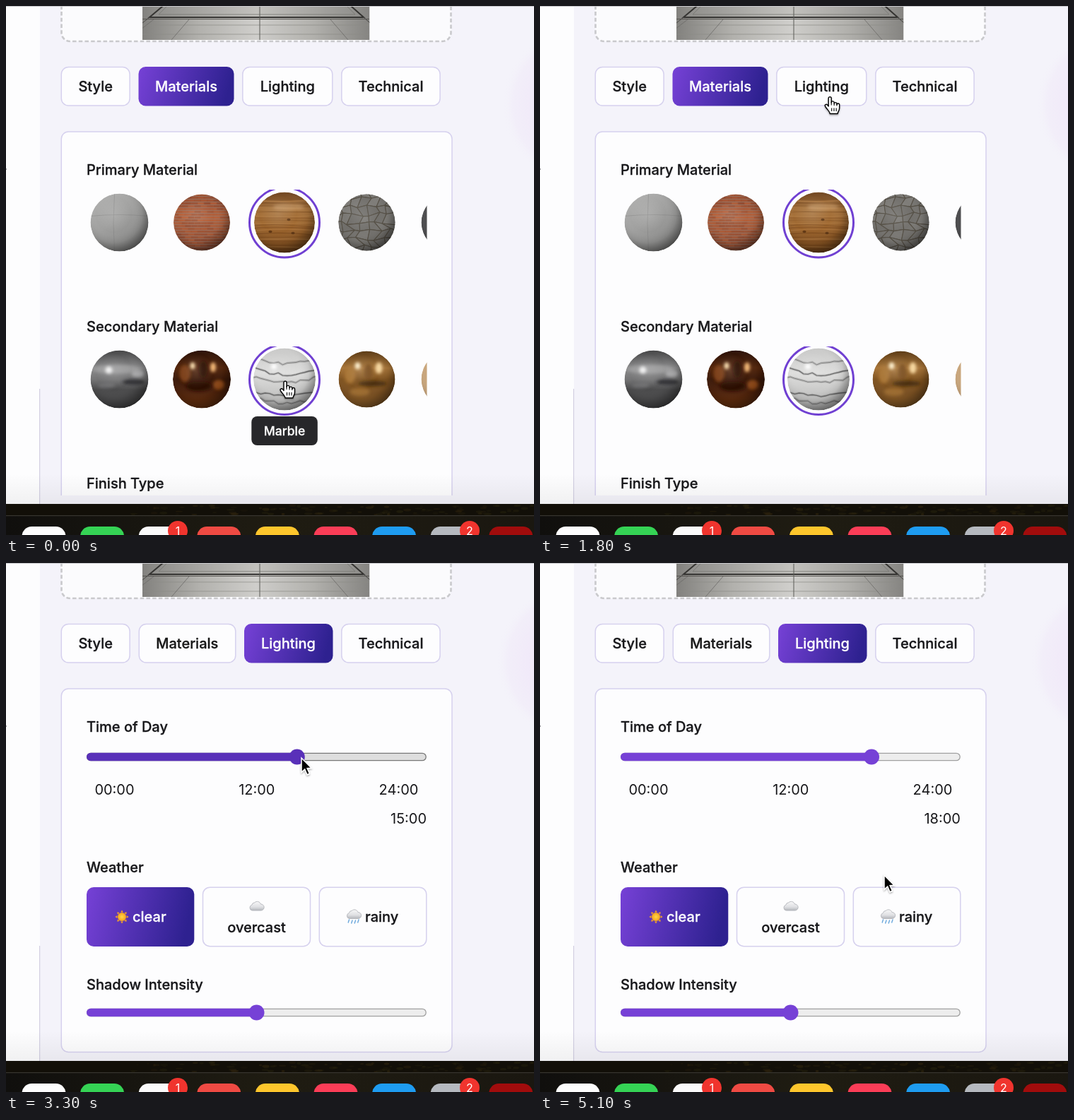
Animation, 747 px wide and 749 px high, one loop 5.2 s. Source, as an HTML page:

```html
<!DOCTYPE html>
<html lang="en">
<head>
<meta charset="utf-8">
<title>Material and lighting panel</title>
<style>
html, body { margin: 0; width: 100%; height: 100%; overflow: hidden; background: #12100c; }
svg { display: block; width: 747px; height: 749px; }
text { font-family: Inter, "Open Sans", sans-serif; white-space: pre; }
</style>
</head>
<body>
<svg id="stage" viewBox="0 0 747 749"></svg>
<script>
const LOOP = 5200, STEP = 100;
const INK = '#17171a', EDGE = '#d6d1ee', PURPLE = '#7641d6';
const stage = document.getElementById('stage');

let seed = 7;
const rnd = () => (seed = (seed * 16807) % 2147483647) / 2147483647;
const span = (a, b) => a + (b - a) * rnd();
const clamp = v => Math.max(0, Math.min(1, v));
const mix = (a, b, p) => a + (b - a) * p;
const list = (n, fn) => Array.from({ length: n }, (_, i) => fn(i)).join('');
const grey = v => `rgb(${[v, v, v].map(Math.round)})`;

const rect = (x, y, w, h, r, fill, more = '') =>
  `<rect x="${x}" y="${y}" width="${w}" height="${h}" rx="${r}" fill="${fill}" ${more}/>`;
const circle = (x, y, r, fill, more = '') =>
  `<circle cx="${x}" cy="${y}" r="${r}" fill="${fill}" ${more}/>`;
const line = (d, color, w = 1, more = '') =>
  `<path d="${d}" fill="none" stroke="${color}" stroke-width="${w}" ${more}/>`;
const label = (x, y, s, { size = 20, weight = 500, fill = INK, anchor = 'start' } = {}) =>
  `<text x="${x}" y="${y}" font-size="${size}" font-weight="${weight}" fill="${fill}" ` +
  `stroke="${fill}" stroke-width="${weight > 400 ? .3 : 0}" text-anchor="${anchor}">${s}</text>`;
const outlined = (x, y, w, h, fill = '#fdfdfe') =>
  rect(x, y, w, h, 10, fill, `stroke="${EDGE}" stroke-width="1.5"`);

const stops = cs => cs.map(([o, c, a = 1]) =>
  `<stop offset="${o}" stop-color="${c}" stop-opacity="${a}"/>`).join('');
const linear = (id, x2, y2, cs) =>
  `<linearGradient id="${id}" x2="${x2}" y2="${y2}">${stops(cs)}</linearGradient>`;
const vertical = (id, cs) => linear(id, 0, 1, cs);

const defs = `<defs>
${linear('active', 1, .12, [[0, '#7641d6'], [1, '#2e2190']])}
${linear('sketch', 1, 0, [[0, '#82817e'], [.25, '#b2b1ad'], [.5, '#cfcecb'], [.75, '#b2b1ad'], [1, '#858481']])}
${linear('rug', 1, 0, [[0, '#8d8c89'], [.5, '#c2c1bd'], [1, '#8d8c89']])}
${vertical('fall', [[0, '#000', 0], [1, '#000', .05]])}
${linear('dock', 1, 0, [[0, '#100f0d'], [.5, '#1f1c12'], [1, '#1a1710']])}
${linear('concrete', .7, 1, [[0, '#b4b4b3'], [.5, '#a0a09f'], [1, '#858584']])}
${vertical('brick', [[0, '#8f4a30'], [.4, '#b0603c'], [1, '#8a4a33']])}
${vertical('wood', [[0, '#6f4520'], [.3, '#a8743d'], [.6, '#9a632c'], [1, '#744519']])}
${vertical('steel', [[0, '#434344'], [.3, '#8a8a8b'], [.5, '#747475'], [.68, '#4a4a4b'], [1, '#4a4a4b']])}
${vertical('copper', [[0, '#2a1006'], [.3, '#54260c'], [.5, '#3a1808'], [.7, '#4b200a'], [1, '#6b3410']])}
${vertical('gold', [[0, '#5b3a14'], [.3, '#a87539'], [.5, '#80531f'], [.75, '#7c5122'], [1, '#8a5d28']])}
${vertical('marble', [[0, '#c9c9c8'], [.4, '#dededd'], [1, '#b3b3b2']])}
<radialGradient id="shade" cx=".4" cy=".36" r=".68">${stops([[0, '#fff', .12], [.45, '#fff', 0], [.72, '#000', .08], [1, '#000', .48]])}</radialGradient>
<radialGradient id="blob">${stops([[0, '#efe5f8'], [.6, '#f1eaf9'], [.85, '#f2eef9'], [1, '#f4f3fa', 0]])}</radialGradient>
<radialGradient id="sun">${stops([[0, '#ffd84a'], [1, '#f6a21c']])}</radialGradient>
${vertical('cloud', [[0, '#f7f7f8'], [.6, '#dfe0e3'], [1, '#b4b6bb']])}
<filter id="soft" x="-1" y="-1" width="3" height="3"><feGaussianBlur stdDeviation="2.2"/></filter>
<filter id="drop" x="-.5" y="-.5" width="2" height="2"><feDropShadow dx="0" dy="1.5" stdDeviation="1.3" flood-opacity=".35"/></filter>
<clipPath id="card"><rect x="70" y="170" width="570" height="523"/></clipPath>
<clipPath id="photo"><rect x="193" width="321.5" height="48"/></clipPath>
<clipPath id="row1"><rect x="114" y="260" width="481.5" height="120"/></clipPath>
<clipPath id="row2"><rect x="114" y="482" width="481.5" height="110"/></clipPath>
<clipPath id="page"><rect width="747" height="705"/></clipPath>
${[40, 41, 43, 44].map(r => `<clipPath id="c${r}"><circle r="${r}"/></clipPath>`).join('')}
</defs>`;

// Sphere textures, drawn around 0,0
const seam = () => line('M-7 -41Q-10 0 -7 41M-41 -9Q0 -13 41 -9', '#777', .8, 'opacity=".45"');

const bricks = () => list(21, i => {
  const y = -41 + i * 4, off = i % 2 * 4.5;
  return list(10, k => rect(-46 + k * 9 + off, y + .4, 8.2, 3.2, .4,
      rnd() < .5 ? '#c0663c' : '#7f402c', `opacity="${span(.05, .4)}"`)) +
    line(`M-42 ${y}H42`, '#94827a', .7, 'opacity=".75"');
});

const grain = () => list(24, i => {
  const y = -42 + i * 3.6 + span(-1, 1);
  return line(`M-44 ${y}C-20 ${y + span(-4, 4)} 14 ${y + span(-4, 4)} 44 ${y + span(-2, 2)}`,
    i % 3 ? '#6a3c16' : '#c48d52', span(.5, 1.8), `opacity="${span(.2, .5)}"`);
}) + [[-20, 13], [12, 15], [6, -4]].map(([x, y]) =>
  `<ellipse cx="${x}" cy="${y}" rx="2.6" ry="1.7" fill="#4c290c" opacity=".7"/>`).join('');

const paving = () => {
  const pts = Array.from({ length: 81 }, (_, i) => {
    const r = Math.floor(i / 9);
    return [(i % 9 - 4) * 12.5 + (r % 2) * 6 + span(-3.6, 3.6), (r - 4) * 11.5 + span(-3.4, 3.4)];
  });
  return list(64, i => {
    const a = Math.floor(i / 8) * 9 + i % 8;
    return `<path d="M${pts[a]}L${pts[a + 1]}L${pts[a + 10]}L${pts[a + 9]}Z" fill="${grey(span(112, 130))}" ` +
      `stroke="#504c45" stroke-width="1.1" stroke-linejoin="round"/>`;
  }) + rect(-42, -42, 84, 84, 0, '#6a5c42', 'opacity=".15"');
};

// Jagged bands that sag to the right and rise again at the rim
const veins = () => [-29, -14, -2, 17, 27].map((y, i) => {
  const path = list(16, k => {
    const x = -46 + k * 6.2;
    return `${k ? 'L' : 'M'}${x} ${y + 7 * Math.sin((x + 40) / 26) + span(-2.2, 2.2)}`;
  });
  return line(path, '#8b8b8b', 3.5, 'opacity=".35" stroke-linejoin="round"') +
    line(path, '#555', i % 2 ? 1.4 : .8, 'opacity=".8" stroke-linejoin="round"');
}).join('');

const gleam = (...spots) => spots.map(([x, y, rx, ry, c]) =>
  `<ellipse cx="${x}" cy="${y}" rx="${rx}" ry="${ry}" fill="${c}" filter="url(#soft)"/>`).join('');

const ball = (x, y, r, fill, inside = '') =>
  `<g transform="translate(${x} ${y})" clip-path="url(#c${r})">` +
  circle(0, 0, r, fill) + inside + circle(0, 0, r, 'url(#shade)') + '</g>';
const ring = y => circle(394, y, 49.5, 'none', 'stroke="#7040d2" stroke-width="3"');

function backdrop() {
  const leaves = list(110, () =>
    `<ellipse cx="${span(180, 747)}" cy="${span(707, 721)}" rx="${span(2, 6)}" ry="${span(.8, 2.2)}" ` +
    `fill="${rnd() < .5 ? '#33270f' : '#25210d'}" opacity="${span(.2, .6)}"/>`);
  const icons = ['#fdfdfd', '#35d355', '#fafafa', '#ef4a43', '#fdc62c', '#fb3d57', '#1e9cf1', '#b5b9bf', '#a10c0c'];
  const badge = (x, s) => circle(x, 743, 14, '#f0342e') +
    label(x, 749, s, { size: 16, weight: 400, fill: '#fff', anchor: 'middle' });
  return rect(0, 700, 747, 49, 0, '#120f08') + leaves +
    rect(0, 721, 747, 28, 0, 'url(#dock)') + rect(0, 721, 747, 1.2, 0, '#37352f') +
    icons.map((c, i) => rect(22.5 + i * 82.6, 737, 62, 62, 14, c)).join('') +
    badge(243, '1') + badge(656, '2');
}

function photo() {
  const boards = [-150, -100, 100, 150].map(d =>
    line(`M${359 + d} 19L${359 + d * 1.25} 48`, '#6b6a67', .8)).join('');
  return '<g clip-path="url(#photo)">' + rect(193, 0, 321.5, 48, 0, 'url(#sketch)') +
    '<path d="M222 0H488L506 16H203Z" fill="url(#rug)" stroke="#353432" stroke-width="2"/>' +
    line('M228 0L216 12H494L482 0', '#777673', .8) +
    line('M193 18.5H514', '#55534f', 1) + line('M193 27H514M193 40H514', '#8b8a86', .7) +
    boards + line('M203 16L193 24M506 16L514 23', '#4a4947') + line('M359 0V48', '#5b5a57') + '</g>';
}

function page() {
  return rect(0, 0, 747, 705, 0, '#f4f3fa') + '<circle id="glow" cy="140" r="112" fill="url(#blob)"/>' +
    rect(0, 0, 48, 705, 0, '#fdfdfe') + rect(47, 542, 1.2, 163, 0, '#d3d0e2') +
    rect(0, 230, 1, 2, 0, '#9a9aa0') +
    label(-9, 520, 's', { size: 18, weight: 400, fill: '#55555c' }) +
    label(-5, 568, ')', { size: 18, weight: 400, fill: '#55555c' }) +
    rect(78.5, -40, 551, 90, 12, '#fbfbfd', 'stroke="#c9c9cc" stroke-width="2.6" stroke-dasharray="5.5 3.2"') +
    photo() + rect(0, 0, 747, 1, 0, '#c6c6ca');
}

function materials() {
  return `<g clip-path="url(#card)">` + outlined(78.3, 178, 552.7, 560) +
    label(114, 239, 'Primary Material') + label(114, 461, 'Secondary Material') +
    label(114, 683, 'Finish Type') +
    '<g clip-path="url(#row1)">' +
    ball(160.5, 306.5, 41, 'url(#concrete)', seam()) +
    ball(277, 306.5, 40, 'url(#brick)', bricks()) +
    ball(394, 306.5, 43, 'url(#wood)', grain() + gleam([6, -22, 22, 5, 'rgba(225,185,135,.4)'])) + ring(306.5) +
    ball(510.5, 306.5, 40, '#6d6a64', paving()) +
    ball(627.5, 306.5, 40, '#4c4c4e') + '</g>' +
    '<g clip-path="url(#row2)">' +
    ball(160.5, 528.5, 41, 'url(#steel)', gleam([-4, -14, 34, 6, '#9b9b9c'], [-15, -13, 5, 5, '#f0f0f0'],
      [26, -8, 9, 5, '#a9a9aa'], [20, 4, 16, 4, '#333334'], [-18, 8, 12, 4, '#6e6e6f'])) +
    ball(277, 528.5, 41, 'url(#copper)', gleam([-24, -8, 8, 12, '#7a3c12'], [-13, -19, 3.5, 5, '#ffe2b0'],
      [16, -17, 4, 7, '#f3b877'], [2, -14, 6, 12, '#2a0f05'], [24, 8, 8, 7, '#8c4715'], [-4, 10, 18, 7, '#2b1006'])) +
    ball(394, 528.5, 44, 'url(#marble)', veins() + gleam([-15, -18, 4, 4, '#fff'])) + ring(529) +
    ball(510.5, 528.5, 40, 'url(#gold)', gleam([-24, -6, 8, 12, '#a87435'], [-13, -19, 4, 5, '#fff0cc'],
      [17, -16, 5, 8, '#f6d79f'], [2, -10, 6, 12, '#7a4d1c'], [8, 6, 20, 4, '#4a2d0c'], [-10, 18, 14, 6, '#9b6a2e'])) +
    ball(627.5, 528.5, 40, '#c9a67c') + '</g></g>';
}

const puff = (x, y) =>
  `<path transform="translate(${x} ${y})" d="M-6 6a4 4 0 0 1-.7-7.8a4.3 4.3 0 0 1 4-3.4a5.2 5.2 0 0 1 8.6 2.2a4.5 4.5 0 0 1 .5 9Z" ` +
  'fill="url(#cloud)" stroke="#b3b5ba" stroke-width=".9"/>';

function lighting() {
  const rays = list(8, i => `<path d="M-1.9 -6.6L0 -9.6L1.9 -6.6Z" fill="#f3a128" transform="translate(164 501) rotate(${i * 45})"/>`);
  const rain = line('M485.5 505l-1.3 4M490 506l-1.3 4M494.5 506l-1.3 4M499 505l-1.3 4', '#6aa7dc', 1.4, 'stroke-linecap="round"');
  const mid = { anchor: 'middle', weight: 400 };
  return outlined(78.3, 178, 552.7, 514.5) +
    label(114, 239, 'Time of Day') + label(153.5, 328, '00:00', mid) +
    label(354.8, 328, '12:00', mid) + label(555.5, 328, '24:00', mid) +
    label(114, 438, 'Weather') + rect(114, 459, 152.3, 84, 10, 'url(#active)') +
    outlined(278.5, 459.2, 152, 83.5) + outlined(443.3, 459.2, 151.5, 83.5) +
    rays + circle(164, 501, 6, 'url(#sun)') + puff(354.5, 486) + puff(492, 497.5) + rain +
    label(179, 508, 'clear', { fill: '#fff' }) +
    label(354.5, 523, 'overcast', { anchor: 'middle' }) + label(508, 508, 'rainy') +
    label(114, 604, 'Shadow Intensity') + slider(636.5, .5, false);
}

function slider(y, v, hot) {
  const x = 125.5 + 458 * v, c = hot ? '#5930b9' : PURPLE;
  return rect(114.6, y - 5.2, 479.6, 10.4, 5.2, hot ? '#dedede' : '#ededed',
      `stroke="${hot ? '#777' : '#a0a0a0'}" stroke-width="1.3"`) +
    rect(114, y - 5.8, x - 114, 11.6, 5.8, c) + circle(x, y, 11, c);
}

const CLICK = 1850;
const PATH = [[0, 395, 531], [500, 395, 531], [900, 391, 444], [1300, 410, 154], [1500, 411, 131], [1900, 410, 128],
  [2200, 410, 128], [2600, 358, 271], [2800, 358, 271], [3800, 478, 281], [4100, 478, 281], [5100, 487, 442]];

function pointer(t) {
  const i = PATH.findIndex(k => k[0] >= t);
  if (i < 1) return PATH[0].slice(1);
  const [a, b] = [PATH[i - 1], PATH[i]];
  const u = (t - a[0]) / (b[0] - a[0]), p = u * u * (3 - 2 * u);
  return [mix(a[1], b[1], p), mix(a[2], b[2], p)];
}

function cursor(x, y, hand) {
  const arrow = '<path d="M0 0V20.2L4.7 15.9L8 23.8L11.4 22.3L8.1 14.7L14 14.3Z" fill="#000" stroke="#fff" stroke-width="1.5"/>';
  const palm = '<path d="M-2 2.2a2 2 0 0 1 4 0V8.5a2 2 0 0 1 4-.2V9.5a2 2 0 0 1 3.8 0V11a1.9 1.9 0 0 1 3.7 0V16' +
    'C13.5 20 11 21 11 24H0C0 21-4 18-6.5 13.8C-8 11.3-5 9.8-3.5 11.6L-2 13.5Z" fill="#fff" stroke="#000" stroke-width="1.4" stroke-linejoin="round"/>' +
    line('M2 8V12M6 9V12.5M9.8 10V13M2.5 16V20.5M5.8 16V20.5M9 16V20.5', '#000', 1.1);
  return `<g transform="translate(${x} ${y})" filter="url(#drop)">${hand ? palm : arrow}</g>`;
}

function tabs(t) {
  const p = clamp((t - CLICK) / 300);
  const mid = fill => ({ anchor: 'middle', fill });
  const idle = (x, w, s) => outlined(x, 86.5, w, 54.5) + label(x + w / 2, 121, s, mid(INK));
  const pair = t >= CLICK
    ? outlined(188.3, 86.5, 136.5, 54.5, `rgba(253,253,254,${p})`) + label(256.3, 121, 'Materials', mid(grey(mix(255, 24, p)))) +
      rect(337, 86, 125.5, 55.5, 10, 'url(#active)') + label(399.5, 121, 'Lighting', mid(grey(mix(24, 255, p))))
    : rect(187.5, 86, 135, 55.5, 10, 'url(#active)') + label(255, 121, 'Materials', mid('#fff')) +
      idle(334.8, 127, 'Lighting');
  return idle(78.3, 96.8, 'Style') + pair + idle(474.8, 139.3, 'Technical');
}

function overlay(t) {
  const [x, y] = pointer(t), lit = t >= CLICK;
  const onTab = y > 86 && y < 142 && x > 335 && x < 462;
  const onBall = !lit && [306.5, 528.5].some(cy => Math.hypot(x - 394, y - cy) < 46);
  let out = tabs(t);
  if (lit) {
    const hour = t < 2700 ? 12 : t >= 3800 ? 18 : Math.round((x - 125.5) / 458 * 24);
    out += slider(274.5, hour / 24, t >= 2500 && t < 4300) +
      label(595, 369, `${hour}:00`, { anchor: 'end', weight: 400 });
  } else {
    out += `<g opacity="${clamp((1050 - t) / 100)}">` + rect(347.3, 581, 93.5, 41, 8, '#27272a') +
      label(394, 608, 'Marble', { size: 17.5, fill: '#fff', anchor: 'middle' }) + '</g>';
  }
  return out + cursor(x, y, onTab || onBall);
}

stage.innerHTML = defs + backdrop() + `<g clip-path="url(#page)">${page()}` +
  `<g id="mat">${materials()}</g><g id="lit">${lighting()}</g></g>` +
  '<g id="top"></g>' + rect(0, 662, 747, 43, 0, 'url(#fall)');

const [glow, mat, lit, upper] = ['glow', 'mat', 'lit', 'top'].map(id => document.getElementById(id));
let shown = -1;

function draw(t) {
  const lightView = t >= CLICK;
  mat.style.display = lightView ? 'none' : '';
  lit.style.display = lightView ? '' : 'none';
  glow.setAttribute('cx', mix(813, 805, clamp((t - 1900) / 700)));
  upper.innerHTML = overlay(t);
}

const start = performance.now();
function tick() {
  const t = Math.floor((performance.now() - start) % LOOP / STEP) * STEP;
  if (t !== shown) draw(shown = t);
  requestAnimationFrame(tick);
}
tick();
</script>
</body>
</html>
```
